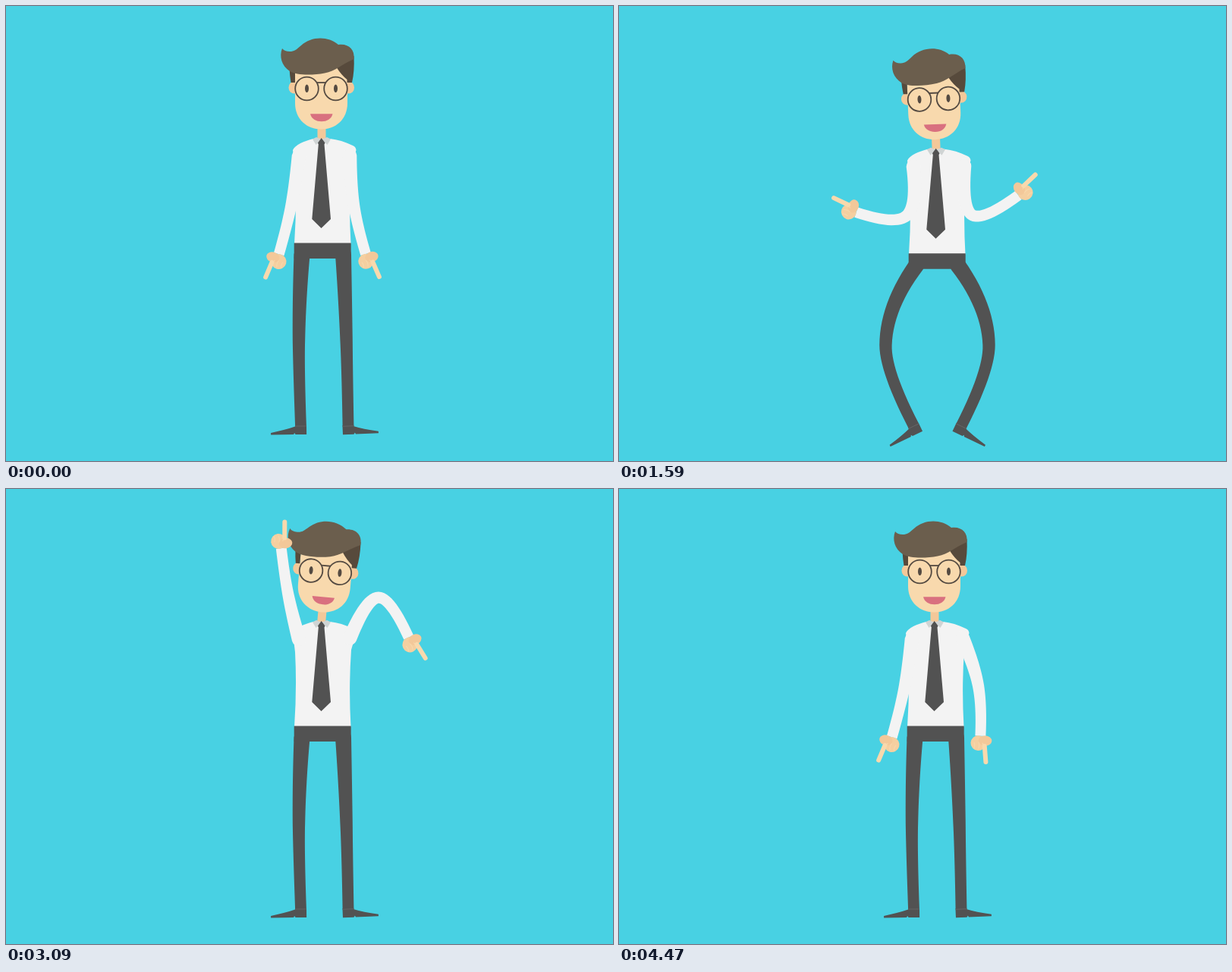
An HTML page that plays this animation: 800 px wide and 600 px high, repeating every 4800 ms.

```html
<!DOCTYPE html>
<html lang="en">
<head>
<meta charset="utf-8">
<title>Dancing office worker</title>
<style>
  html, body { margin: 0; width: 100%; height: 100%; overflow: hidden; background: #48d1e3; }
  svg { display: block; width: 100%; height: 100%; }
  .dark { fill: #525252; }
  .shirt { fill: #f3f3f3; }
  .skin { fill: #f8d9ad; }
  .shade { fill: #f3c899; }
  .hair { fill: #6b5e4d; }
  .hairShade { fill: #574a3c; }
  .wire { fill: none; stroke: #544a41; stroke-width: 1.8; }
  .seam { stroke: #6c6c6c; stroke-width: .7; }
  .crease { fill: none; stroke: #f8d9ad; stroke-width: 1; }
  .finger { stroke: #f8d9ad; stroke-width: 6; stroke-linecap: round; }
</style>
</head>
<body>
<svg viewBox="0 0 800 600">
  <defs>
    <!-- wrist at 0,0; the arm runs along +x -->
    <g id="hand">
      <ellipse cx="9.5" cy="-2.5" rx="10" ry="10" fill="#f5cfa0"/>
      <ellipse cx="6" cy="6.5" rx="6.8" ry="8.8" class="shade"/>
      <path d="M13 6L34 8.6" class="finger"/>
      <path d="M9 -8Q14 -6 17 -8M8 -2Q13 0 17 -2M9 3L14 5" class="crease"/>
    </g>
    <!-- ankle at 0,0; toe to the left -->
    <g id="foot">
      <path class="dark" d="M-7.5 -1V.5Q-19 4.5-39.5 8.5V11H-9.5L-8.5 9L-7 11H7.5V-1Z"/>
      <path class="seam" d="M-7.5 0H7.5"/>
    </g>
  </defs>

  <path id="legL" class="dark"/>
  <path id="legR" class="dark"/>
  <use id="footL" href="#foot"/>
  <use id="footR" href="#foot"/>

  <g id="body">
    <g id="head">
      <path class="shade" d="M410.5 155H421.5V180H410.5Z"/>
      <ellipse class="shade" cx="380" cy="107.5" rx="7.5" ry="8"/>
      <ellipse class="shade" cx="451.5" cy="107.5" rx="7.5" ry="8"/>
      <path class="skin" d="M381 78V128C381 150 397 162.5 415.5 162.5S450 150 450 128V78Z"/>
      <path class="hairShade" d="M373.5 82Q374 92 375.5 101H381V82ZM458.5 66L436 78V81.5Q442 91 449.5 97V101H456Q459.5 86 458.5 66Z"/>
      <path class="hair" d="M364 56C360 66 363 79 374 86C382 91 402 92 420 88.5C434 86 444 76 458.5 70C460 57 451 49 438 51C424 39 402 40 389 52C382 58 380 60 374 60Q367 60 364 56Z"/>
      <circle class="wire" cx="396.5" cy="109" r="15.3"/>
      <circle class="wire" cx="434.5" cy="109" r="15.3"/>
      <path class="wire" d="M409.5 101H421.5"/>
      <ellipse cx="396.5" cy="108.7" rx="2.5" ry="5.3" fill="#544a41"/>
      <ellipse cx="434.5" cy="108.7" rx="2.5" ry="5.3" fill="#544a41"/>
      <path d="M401 142.3H430.5C429 149 423 152.3 415.8 152.3S402.5 149 401 142.3Z" fill="#d9707f"/>
    </g>
    <path class="shirt" d="M405 175C393 178 381 183 378 190L381 215Q383.5 262 380 314H454.5Q451.5 262 455 212L461.5 190Q461 185.5 457 184C447 179 437 176 427 175Z"/>
    <path d="M404 175.5L409 173L416 176L408.5 183ZM428 175.5L423 173L416 176L423.5 183Z" fill="#d0d4d4"/>
    <path class="dark" d="M415.7 174L420.5 180.5L419.5 182.5L428 281L415.5 293L403.3 281L411.8 182.5L411 180.5Z"/>
    <path class="dark" d="M379.7 312.5H454.7V333H379.7Z"/>
    <path id="armL" class="shirt"/>
    <path id="armR" class="shirt"/>
    <use id="handL" href="#hand"/>
    <use id="handR" href="#hand"/>
  </g>
</svg>
<script>
const LOOP = 4800, STEP = 30, BEAT = 210, SWAY_END = 6 * BEAT, DANCE = 1440;
const ARM = 66, LEG = 113.05; // half lengths of the limbs
const el = {};
document.querySelectorAll('[id]').forEach(e => el[e.id] = e);

// Pose: body x, y, head tilt, left arm angle and bow, right arm angle and bow
const rest = [0, 0, 0, 101.5, -3, 80.8, 5];
const lean = [0, 0, 27.5, 120.8, -2, 61.2, 23];
const dance = [
  { t: DANCE, pose: rest },
  { t: 1590, pose: [2, 4, -2.3, 141.3, -45, 28.6, 52] },
  { t: 2070, pose: [2, 28.7, -1.8, 212.4, -36, -45.7, -5] },
  { t: 2670, pose: [-14, 39.5, 9.2, 228, -13, -45.3, -5] },
  { t: 3060, pose: [0, 0, 5, 258, -3, -5, -52] },
  { t: 3630, pose: [0, 0, 9.2, 253.7, -4, 82.2, -40] },
  { t: 4470, pose: [0, 0, 0, 101.5, -3, 79.7, -9] }
];

const rad = a => a * Math.PI / 180;
const clamp = v => Math.min(1, Math.max(0, v));
const smooth = u => u * u * (3 - 2 * u);

// Side to side: every beat swings out or back, after a short stop
function swayAmount(t) {
  if (t >= SWAY_END) return 0;
  const k = smooth(clamp((t % BEAT - STEP) / (BEAT - STEP)));
  return Math.floor(t / BEAT) % 2 ? 1 - k : k;
}

// Smooth curve through the key poses; unchanged values stay still
function dancePose(t) {
  const last = dance.length - 1;
  if (t >= dance[last].t) return dance[last].pose;
  const i = dance.findIndex(p => p.t > t) - 1;
  const a = dance[i], b = dance[i + 1], h = b.t - a.t, u = (t - a.t) / h, w = 1 - u;
  return a.pose.map((v, c) => {
    const rate = j => (dance[j + 1].pose[c] - dance[j].pose[c]) / (dance[j + 1].t - dance[j].t);
    const slope = j => {
      const p = rate(Math.max(0, j - 1)), q = rate(Math.min(last - 1, j));
      return p * q ? (p + q) / 2 : 0;
    };
    return v + (b.pose[c] - v) * smooth(u) + h * u * w * (w * slope(i) - u * slope(i + 1));
  });
}

// Knees give twice between 1470 and 2670
const dip = t => t > 1470 && t < 2670 ? 28 * Math.sin(Math.PI * (t - 1470) / 600) ** 2 : 0;

// Bendy tapered limb from a to b, bowed sideways; returns the angle at its end
function limb(path, a, b, bow, bend, r0, r1) {
  const dx = b[0] - a[0], dy = b[1] - a[1], d = Math.hypot(dx, dy);
  const m = [(a[0] + b[0]) / 2 - dy / d * bow, (a[1] + b[1]) / 2 + dx / d * bow];
  const halves = [
    [a, [m[0] - dx * bend[0], m[1] - dy * bend[0]], m],
    [m, [m[0] + dx * bend[1], m[1] + dy * bend[1]], b]
  ];
  const one = [], two = [], N = 14;
  let angle = 0;
  for (let i = 0; i <= 2 * N; i++) {
    const k = i < N ? 0 : 1, u = i / N - k, w = 1 - u, [p, q, s] = halves[k];
    const at = c => w * w * p[c] + 2 * u * w * q[c] + u * u * s[c];
    const vel = c => w * (q[c] - p[c]) + u * (s[c] - q[c]);
    angle = Math.atan2(vel(1), vel(0));
    const r = r1 + (r0 - r1) * (1 - i / (2 * N)) ** 2;
    const nx = -Math.sin(angle) * r, ny = Math.cos(angle) * r;
    one.push((at(0) + nx).toFixed(2) + ' ' + (at(1) + ny).toFixed(2));
    two.unshift((at(0) - nx).toFixed(2) + ' ' + (at(1) - ny).toFixed(2));
  }
  path.setAttribute('d', `M${one.concat(two).join('L')}A${r0} ${r0} 0 0 0 ${one[0]}Z`);
  return angle * 180 / Math.PI;
}

// More bow means less reach; raised arms lose a little more
function drawArm(side, shoulder, deg, bow, flip) {
  const a = rad(deg);
  const reach = 2 * Math.sqrt(Math.max(0, ARM * ARM - bow * bow)) - 10 * Math.max(0, -Math.sin(a));
  const wrist = [shoulder[0] + reach * Math.cos(a), shoulder[1] + reach * Math.sin(a)];
  const end = limb(el['arm' + side], shoulder, wrist, bow, [.2, .2], 9.3, 7);
  el['hand' + side].setAttribute('transform',
    `translate(${wrist}) rotate(${end}) scale(1 ${flip})`);
}

// The knee follows from the distance between hip and ankle
function drawLeg(side, hip, ankle, dir) {
  const d = Math.hypot(ankle[0] - hip[0], ankle[1] - hip[1]);
  const bow = -dir * Math.sqrt(Math.max(0, LEG * LEG - d * d / 4));
  const end = limb(el['leg' + side], hip, ankle, bow, [.24, .16], 10.5, 7.4);
  el['foot' + side].setAttribute('transform',
    `translate(${ankle}) rotate(${end - 90 - dir * 1.5}) scale(${-dir} 1)`);
}

function draw(t) {
  const k = swayAmount(t);
  const pose = t < DANCE ? rest.map((v, i) => v + (lean[i] - v) * k) : dancePose(t);
  const [x, base, tilt, leftAngle, leftBow, rightAngle, rightBow] = pose;
  const y = base + dip(t);
  el.body.setAttribute('transform', `translate(${x} ${y})`);
  el.head.setAttribute('transform', `rotate(${tilt} 416 172)`);
  drawArm('L', [386, 198], leftAngle, leftBow, 1);
  drawArm('R', [453, 197], rightAngle, rightBow, -1);
  drawLeg('L', [390 + x, 328 + y], [388.5, 554], -1);
  drawLeg('R', [444.5 + x, 328 + y], [451 - 2 * k, 554 - 8 * k], 1);
}

const start = performance.now();
function tick() {
  const t = (performance.now() - start) % LOOP;
  draw(Math.floor(t / STEP) * STEP);
  requestAnimationFrame(tick);
}
tick();
</script>
</body>
</html>
```
